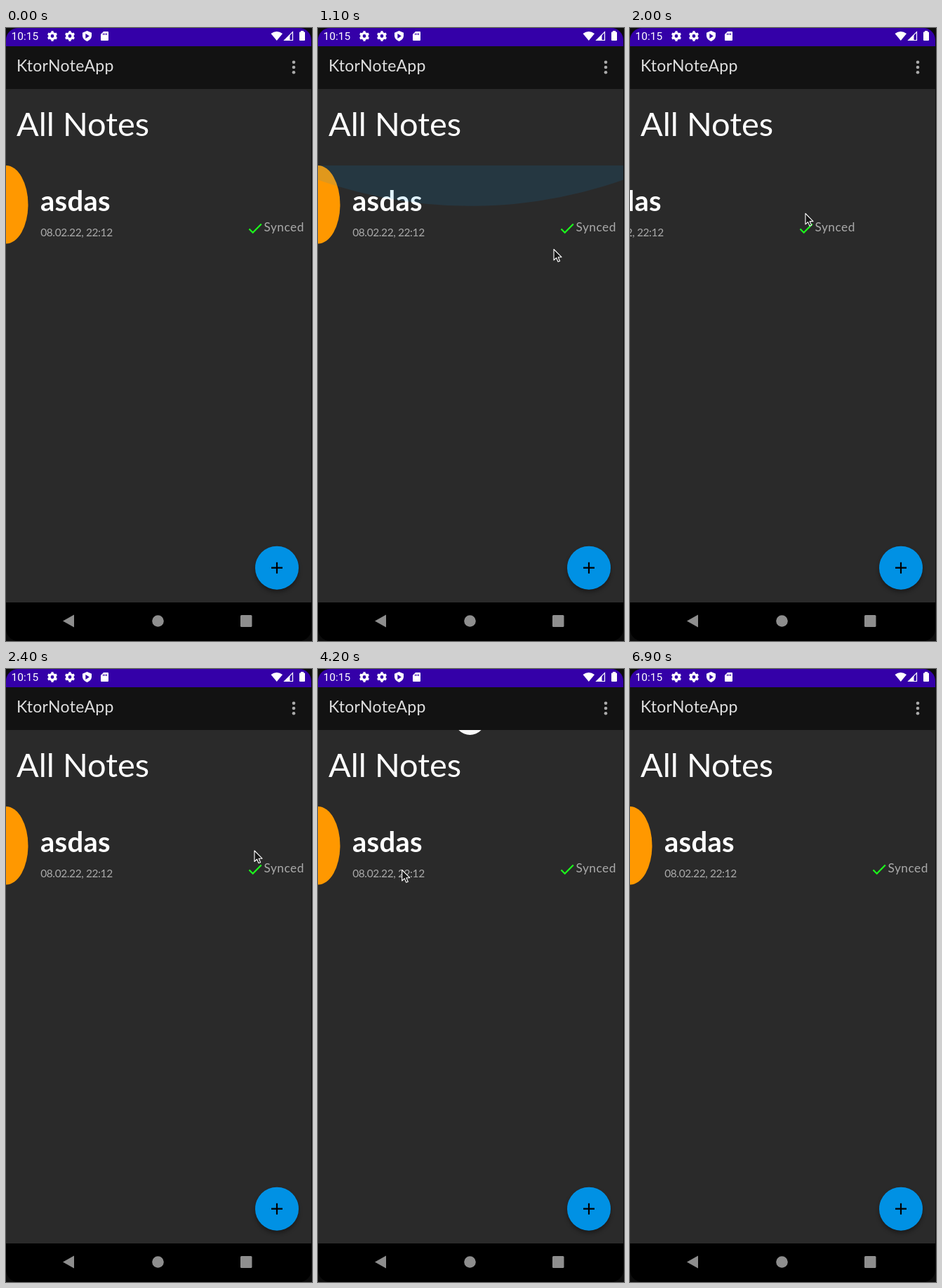
These frames come from a looping animation (436x874 px, 7 s). An HTML page:

```html
<!DOCTYPE html>
<html lang="en">
<head>
<meta charset="utf-8">
<title>Notes</title>
<style>
  html, body { margin: 0; width: 100%; height: 100%; overflow: hidden; background: #0c0c0c; }
  svg { display: block; width: 436px; height: 874px; }
  text { font-family: Lato, "Open Sans", sans-serif; white-space: pre; }
  .clock { font: 15.5px Roboto, sans-serif; }
</style>
</head>
<body>
<svg viewBox="0 0 436 874" xmlns="http://www.w3.org/2000/svg">
  <defs>
    <clipPath id="screen"><rect width="435" height="874" rx="17"/></clipPath>
    <clipPath id="page"><rect y="87" width="435" height="732"/></clipPath>
    <clipPath id="list"><rect y="196" width="435" height="623"/></clipPath>
    <filter id="soft" x="-30%" y="-30%" width="160%" height="160%"><feGaussianBlur stdDeviation="3"/></filter>
    <g id="gear" stroke="#fff">
      <circle r="4.1" fill="none" stroke-width="3.4"/>
      <path d="M0 -7.2V-5M0 7.2V5M-6.2 -3.6L-4.3 -2.5M6.2 3.6L4.3 2.5M-6.2 3.6L-4.3 2.5M6.2 -3.6L4.3 -2.5" stroke-width="3.2"/>
    </g>
  </defs>

  <g clip-path="url(#screen)">
    <rect width="435" height="874"/>
    <rect y="87" width="435" height="732" fill="#2a2a2a"/>
    <rect y="26" width="435" height="61" fill="#121212"/>
    <rect width="435" height="26" fill="#3400a8"/>
  </g>

  <g fill="#fff">
    <text class="clock" x="7.5" y="17.3">10:15</text>
    <use href="#gear" x="66" y="11.5"/>
    <use href="#gear" x="91" y="11.5"/>
    <path d="M115.5 4L122 6.8V11.5Q121.5 16.5 115.5 19Q109.5 16.5 109 11.5V6.8Z"/>
    <path d="M113.4 8V15L118.8 11.5Z" fill="#3400a8"/>
    <path d="M139 5H145Q146 5 146 6V17Q146 18 145 18H136Q135 18 135 17V9Z"/>
    <path d="M138.6 7.5V10M141 7.5V10M143.4 7.5V10" stroke="#3400a8" stroke-width="1.2"/>
    <path d="M377.5 8Q385.7 1.8 394 8L385.8 18Z"/>
    <path d="M396.7 17.5L408.5 5.7V17.5Z" fill="none" stroke="#fff" stroke-width="1.2"/>
    <path d="M396 18L404.5 9.5V18Z"/>
    <path d="M420 4H424V5.5H425Q426 5.5 426 6.5V17Q426 18 425 18H419Q418 18 418 17V6.5Q418 5.5 419 5.5H420Z"/>
  </g>

  <text x="15" y="61.5" font-size="23" letter-spacing=".3" fill="#dedede">KtorNoteApp</text>
  <g fill="#aaa">
    <circle cx="410" cy="48.8" r="2.3"/><circle cx="410" cy="56" r="2.3"/><circle cx="410" cy="63.2" r="2.3"/>
  </g>

  <text x="15" y="153.5" font-size="47" fill="#fff">All Notes</text>

  <g clip-path="url(#list)">
    <g id="note">
      <ellipse cy="251.8" rx="31.5" ry="55.7" fill="#ff9800"/>
      <text x="49" y="261" font-size="40" font-weight="700" letter-spacing=".3" fill="#fff">asdas</text>
      <text x="49.2" y="297" font-size="15.5" letter-spacing="-.4" fill="#aaa">08.02.22, 22:12</text>
      <path d="M346.5 286.5L351.7 291.7L363.8 279.5" fill="none" stroke="#1bff1b" stroke-width="2.2"/>
      <text x="367.5" y="289.8" font-size="17.3" letter-spacing=".5" fill="#aaa">Synced</text>
    </g>
    <circle id="glow" cx="217.5" r="652" fill="#0091e4"/>
  </g>

  <g clip-path="url(#page)"><circle id="pull" cx="216.5" r="22" fill="#fafafa"/></g>

  <circle cx="386" cy="773.5" r="30.5" opacity=".4" filter="url(#soft)"/>
  <circle cx="386" cy="769.7" r="31" fill="#0091e4"/>
  <path d="M378 769.7H394M386 761.7V777.7" stroke="#000" stroke-width="2.2"/>

  <g fill="#8e8e8e">
    <path d="M81 845.5L97 836.5V854.5Z"/>
    <circle cx="216.5" cy="845.5" r="8.3"/>
    <rect x="334" y="837" width="16.5" height="17" rx="1.5"/>
  </g>

  <path id="cursor" d="M0 0V15.5L3.6 12.2L6 17.8L8.6 16.7L6.2 11.2H11Z" fill="#161616" stroke="#fff" stroke-width="1.1" stroke-linejoin="round"/>
</svg>
<script>
const LOOP = 7000, STEP = 100, GONE = 5100;
const PAUSE = { from: 4200, to: 4400 };
const [note, glow, pull, cursor] =
  ["note", "glow", "pull", "cursor"].map(id => document.getElementById(id));

// Pointer stops: time, x, y
const stops = [
  [0, 440, 450], [1100, 336, 315.5], [1700, 354, 268], [2400, 354, 259],
  [3000, 312.5, 251.5], [4200, 119.7, 286.5], [GONE, 130, 400]
];

const clamp = v => Math.max(0, Math.min(1, v));
const smooth = p => p * p * (3 - 2 * p);
// Rises from 0 to 1 and falls back between two times
const swell = (t, from, to) => Math.sin(Math.PI * clamp((t - from) / (to - from)));
const shift = (node, x, y) => node.setAttribute("transform", `translate(${x} ${y})`);

function pointer(t) {
  const i = stops.findIndex(s => s[0] > t);
  const [t0, x0, y0] = stops[i - 1], [t1, x1, y1] = stops[i];
  const p = smooth((t - t0) / (t1 - t0));
  return [x0 + (x1 - x0) * p, y0 + (y1 - y0) * p];
}

function draw(ms) {
  let t = Math.floor((ms % LOOP) / STEP) * STEP;
  if (t > PAUSE.from && t < PAUSE.to) t = PAUSE.from;

  const slide = -106.7 * swell(t, 1700, 2400);
  shift(note, slide, 0);

  const shown = t > 0 && t < GONE;
  cursor.setAttribute("visibility", shown ? "visible" : "hidden");
  if (shown) {
    const [x, y] = pointer(t);
    shift(cursor, x + slide, y);
  }

  const stretch = swell(t, 900, 1600);
  glow.setAttribute("cy", 196 + 74 * stretch - 652);
  glow.setAttribute("opacity", 0.155 * stretch);

  const depth = 9.3 * swell(t, 2970, 3700) + 13 * swell(t, 4000, GONE);
  pull.setAttribute("cy", 87 + depth - 22);
}

const start = performance.now();
function tick() {
  draw(performance.now() - start);
  requestAnimationFrame(tick);
}
tick();
</script>
</body>
</html>
```
